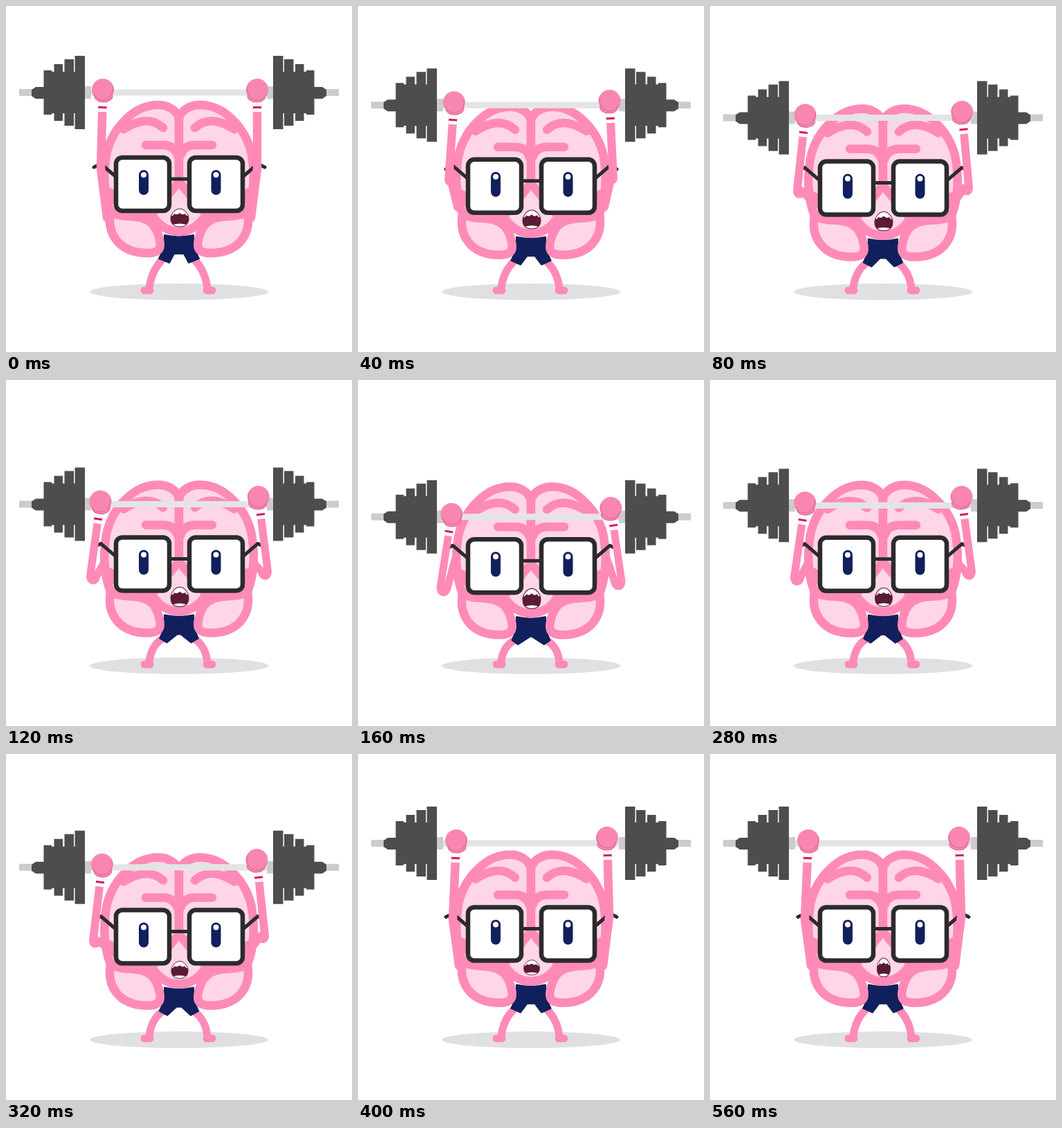
Write an HTML page that moves like this. It is 500 px wide and 500 px high and loops after 0.6 s.

```html
<!DOCTYPE html>
<html>
<head>
<meta charset="utf-8">
<style>
  html, body { margin: 0; height: 100%; overflow: hidden; background: #fff; }
  svg { display: block; width: 100vw; height: 100vh; }
  .line { fill: none; stroke: #ff8ab8; stroke-width: 12.5; stroke-linecap: round; stroke-linejoin: round; }
  .frame { fill: none; stroke: #2b2b2b; stroke-width: 6.5; stroke-linejoin: round; }
  .thin { stroke-width: 5; stroke-linecap: round; }
  .pale { fill: #ffd6e8; }
  .navy { fill: #11205c; }
</style>
</head>
<body>
<svg viewBox="0 0 500 500">
  <defs>
    <g id="half">
      <path class="pale" d="M251 162C246 149 232 143 220 143C198 143 184 153 173 164C155 181 146 203 144 222C140 250 143 278 151 297L214 303Q230 327 251 327Z"/>
      <g class="line">
        <path d="M250 162C246 149 232 143 220 143C198 143 184 153 173 164C155 181 146 203 144 222C140 250 143 278 151 297"/>
        <path d="M250 162V254L214 297C195 305 172 303 151 297"/>
        <path d="M213 305Q228 326 250 326"/>
        <path d="M202 201H227Q243 201 248 216"/>
        <path d="M170 178C187 167 208 159 227 176"/>
        <path d="M144 268Q154 268 159 282"/>
        <path class="pale" d="M151 298C146 326 160 357 205 357C226 357 224 345 221 334C216 314 205 305 180 304Q163 304 151 298Z"/>
      </g>
    </g>
    <g id="lens">
      <path class="frame thin" d="M158 246L137 228L127 233"/>
      <rect class="frame" style="fill:#fff" x="159" y="219" width="77" height="77" rx="9"/>
    </g>
    <g id="pupil">
      <rect class="navy" x="192" y="237" width="14" height="36" rx="7"/>
      <circle cx="199" cy="244" r="4" fill="#fff"/>
    </g>
    <g id="weights">
      <path fill="#ccc" d="M19-5H42V5H19ZM114-9H123V9H114Z"/>
      <path id="plates" fill="#4d4d4d"/>
    </g>
    <g id="fist" fill="#f986b2" stroke="#dc6d98" stroke-width="1.2">
      <ellipse cx="1" cy="8" rx="13" ry="9"/>
      <circle r="16" cy="-1" stroke="none"/>
      <path fill="none" d="M-13 5A14 14 0 0 0 13 5Q16-1 14-6"/>
    </g>
    <path id="lips" d="M0-13C7-13 13-5 13 1C13 9 8 13 0 13S-13 9-13 1C-13-5-7-13 0-13Z"/>
    <clipPath id="inside"><use href="#lips"/></clipPath>
  </defs>

  <ellipse cx="250" cy="413" rx="129" ry="12" fill="#e0e0e3"/>
  <g id="legs" class="line" style="stroke-width:11"></g>
  <path id="shorts" class="navy" stroke="#11205c" stroke-width="2" stroke-linejoin="round"/>
  <g id="body">
    <use href="#half"/>
    <use href="#half" transform="translate(500) scale(-1 1)"/>
    <g id="mouth">
      <g clip-path="url(#inside)">
        <rect x="-14" y="-16" width="28" height="32" fill="#5a1c33"/>
        <path fill="#fff" d="M-14-16H14V-3Q9-2 8-6Q4-3 0-7Q-4-3-8-6Q-9-2-14-3ZM-10 10Q0 7 10 10V14H-10Z"/>
      </g>
      <use href="#lips" fill="none" stroke="#5a1c33"/>
    </g>
    <path class="frame thin" d="M237 250H264"/>
    <use href="#lens"/>
    <use href="#lens" transform="translate(501) scale(-1 1)"/>
    <use href="#pupil"/>
    <use href="#pupil" x="104.5"/>
  </g>
  <g id="bar">
    <path fill="#e4e4e4" d="M114-4.5H387V4.5H114Z"/>
    <use href="#weights"/>
    <use href="#weights" transform="translate(500) scale(-1 1)"/>
  </g>
  <g id="arms"></g>
</svg>
<script>
const $ = id => document.getElementById(id);
const set = (id, name, value) => $(id).setAttribute(name, value);
const mirror = shape => shape + `<g transform="translate(500) scale(-1 1)">${shape}</g>`;

// Collar and solid core, then four plates that shrink outwards.
let plates = 'M37-4L43-8H56V-30H114V30H56V9H43L37 5Z';
for (let i = 0; i < 4; i++) {
  const h = 53 - 4 * i - i * i;
  plates += `M${99.5 - 15 * i} ${-h}h${14.5 - i}v${2 * h}h${i - 14.5}z`;
}
set('plates', 'd', plates);

// Drawn as a left arm; the right one is mirrored.
function arm(hx, hy, squat) {
  const bend = Math.sin(squat * Math.PI / 2);
  const ex = 137 - 19 * bend, ey = hy + 113 - 10 * squat;
  const length = Math.hypot(ex - hx, ey - hy);
  const point = r => `${hx + (ex - hx) * r / length} ${hy + (ey - hy) * r / length}`;
  const band = (from, to, color) =>
    `<path d="M${point(from)}L${point(to)}" stroke="${color}" stroke-width="12"/>`;
  return `<path class="line" style="stroke-width:${12.5 - 2 * squat}"
    d="M${hx} ${hy}L${ex} ${ey}c0 ${9 * bend} ${9 * bend} ${11 * bend} ${11 * bend} 0L${146 - 6 * bend} ${306 - 50 * bend}"/>` +
    band(17, 31, '#fff') + band(23, 26, '#d81b56') +
    `<use href="#fist" transform="translate(${hx} ${hy})"/>`;
}

function draw(t) {
  const squat = Math.max(0, 1 - Math.abs(t - 200) / 200);
  const settle = t > 200 ? 1 - squat : 0;
  const talk = Math.max(0, (t - 400) / 160);
  const barY = 125 + 91 * squat + 4 * settle;
  const drop = 14 * squat + 2.5 * settle ** 2;
  const k = drop / 14;

  set('bar', 'transform', `translate(0 ${barY})`);
  set('body', 'transform', `translate(0 ${drop})`);
  const wide = 13 - 1.5 * settle - 1.8 * talk;
  const tall = 13 + 2 * squat - 2.2 * settle + 2.7 * talk;
  set('mouth', 'transform', `translate(251 ${306 - 1.5 * squat}) scale(${wide / 13} ${tall / 13})`);

  const top = 331 + drop, hem = 365 + drop, cuff = 236 - 6 * k, crotch = 243 + 7 * k;
  set('shorts', 'd', `M229 ${top}Q230 ${top + 18} ${221 + 2 * k} ${hem}L${cuff} ${hem + 6}L${crotch} ${hem - 7 + 2 * k}` +
    `H${500 - crotch}L${500 - cuff} ${hem + 6}L${279 - 2 * k} ${hem}Q270 ${top + 18} 271 ${top}Q250 ${top + 5} 229 ${top}Z`);
  const leg = `<path d="M229 ${364 + drop}Q${211 - k} ${382 + 2 * k} 208 408Q207 411 201 411H209"/>`;
  $('legs').innerHTML = `<g transform="translate(-1)">${mirror(leg)}</g>`;

  const left = arm(140 - 6 * squat + 2 * settle, barY - 3, squat);
  const right = arm(137 - 3 * squat + 3 * settle, barY - 3 - 11 * squat - 4 * settle, squat);
  $('arms').innerHTML = left + `<g transform="translate(500) scale(-1 1)">${right}</g>`;
}

const start = performance.now();
function tick() {
  const t = (performance.now() - start) % 600;
  draw(Math.floor(t / 40) * 40);
  requestAnimationFrame(tick);
}
tick();
</script>
</body>
</html>
```
